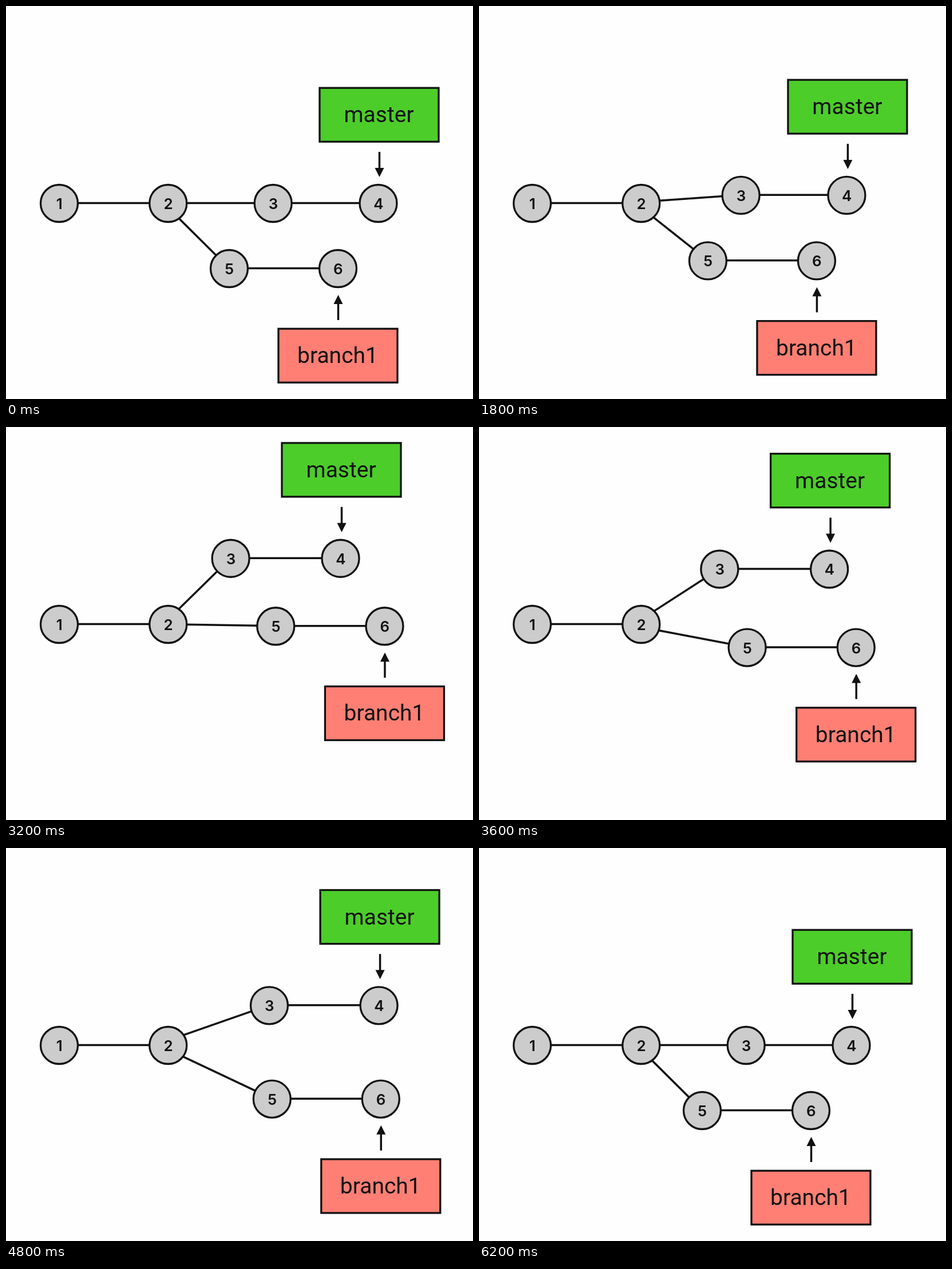
These frames come from a looping animation (816 by 687 pixels, 6400 ms). An HTML page:

```html
<!DOCTYPE html>
<html lang="en">
<head>
<meta charset="utf-8">
<title>Branching commits</title>
<style>
  html, body { margin: 0; width: 100%; height: 100%; overflow: hidden; background: #fefefe; }
  svg { display: block; width: 816px; height: 687px; }
  line { stroke: #111; stroke-width: 3.5; }
  circle { fill: #ccc; stroke: #111; stroke-width: 3.3; }
  rect { stroke: #111; stroke-width: 3.3; }
  text { fill: #111; text-anchor: middle; }
  .num { font: 600 26px Inter, sans-serif; }
  .label { font: 39px Roboto, sans-serif; }
</style>
</head>
<body>
<svg viewBox="0 0 816 687"></svg>
<script>
const LOOP = 6400, STEP = 200, MOVE = 960;
const ROOT = [93, 345], FORK = [283.3, 345];

// Each pose: x of nodes 3 and 4, their y, x of nodes 5 and 6, their y.
const POSES = [
  { at: 4940, pose: [466.7, 650.5, 345, 390, 580, 459] },
  { at: 1500, pose: [392.6, 584.5, 229.7, 471.3, 661.5, 348.2] },
  { at: 3150, pose: [460, 651.6, 275.3, 464.8, 654.8, 438.8] }
];

const svg = document.querySelector("svg");

function add(parent, tag, attrs, content) {
  const el = document.createElementNS("http://www.w3.org/2000/svg", tag);
  set(el, attrs);
  if (content) el.textContent = content;
  parent.append(el);
  return el;
}

function set(el, attrs) {
  for (const key in attrs) el.setAttribute(key, attrs[key]);
}

function place(el, x, y) {
  el.setAttribute("transform", `translate(${x} ${y})`);
}

function join(el, x1, y1, x2, y2) {
  set(el, { x1, y1, x2, y2 });
}

function makeNode(n) {
  const g = add(svg, "g", {});
  add(g, "circle", { r: 32.5 });
  add(g, "text", { class: "num", x: 0.3, y: 10 }, n);
  return g;
}

// A label box with its arrow, placed relative to the node it points at.
function makeTag(name, fill, dir, boxX, boxY, textX) {
  const g = add(svg, "g", {});
  add(g, "rect", { x: boxX - 104, y: boxY - 47, width: 208, height: 94, fill });
  add(g, "text", { class: "label", x: textX, y: boxY + 13 }, name);
  const x = boxX + 0.5;
  add(g, "line", { x1: x, x2: x, y1: dir * 90, y2: dir * 60 });
  add(g, "path", { d: `M${x} ${dir * 46}l-8 ${dir * 16}h16z`, fill: "#111" });
  return g;
}

const edges = Array.from({ length: 5 }, () => add(svg, "line", {}));
const nodes = [1, 2, 3, 4, 5, 6].map(makeNode);
const master = makeTag("master", "#4ccd2a", -1, 1.5, -154.8, 1);
const branch = makeTag("branch1", "#ff7f74", 1, 0, 152.2, -0.5);

const ease = t => t < 0.5 ? 4 * t ** 3 : 1 - 4 * (1 - t) ** 3;
const clamp = (v, lo, hi) => Math.min(hi, Math.max(lo, v));

function poseAt(time) {
  let now = POSES[0].pose;
  for (const { at, pose } of [...POSES.slice(1), POSES[0]]) {
    const k = ease(clamp((time - at) / MOVE, 0, 1));
    now = now.map((v, i) => v + (pose[i] - v) * k);
  }
  return now;
}

// The sloping edges leave the fork a little above or below its centre.
function joinFork(el, x, y) {
  const shift = clamp((y - FORK[1]) * 0.13, -8, 8);
  join(el, FORK[0], FORK[1] - 0.6 + shift, x, y - 0.6);
}

function draw(time) {
  const [x3, x4, yTop, x5, x6, yLow] = poseAt(time);
  const spots = [ROOT, FORK, [x3, yTop], [x4, yTop], [x5, yLow], [x6, yLow]];
  spots.forEach(([x, y], i) => place(nodes[i], x, y));
  place(master, x4, yTop);
  place(branch, x6, yLow);
  join(edges[0], ROOT[0], 344.4, FORK[0], 344.4);
  joinFork(edges[1], x3, yTop);
  joinFork(edges[2], x5, yLow);
  join(edges[3], x3, yTop - 0.6, x4, yTop - 0.6);
  join(edges[4], x5, yLow - 0.6, x6, yLow - 0.6);
}

const start = performance.now();

function tick() {
  const time = (performance.now() - start) % LOOP;
  draw(Math.floor(time / STEP) * STEP);
  requestAnimationFrame(tick);
}

tick();
</script>
</body>
</html>
```
